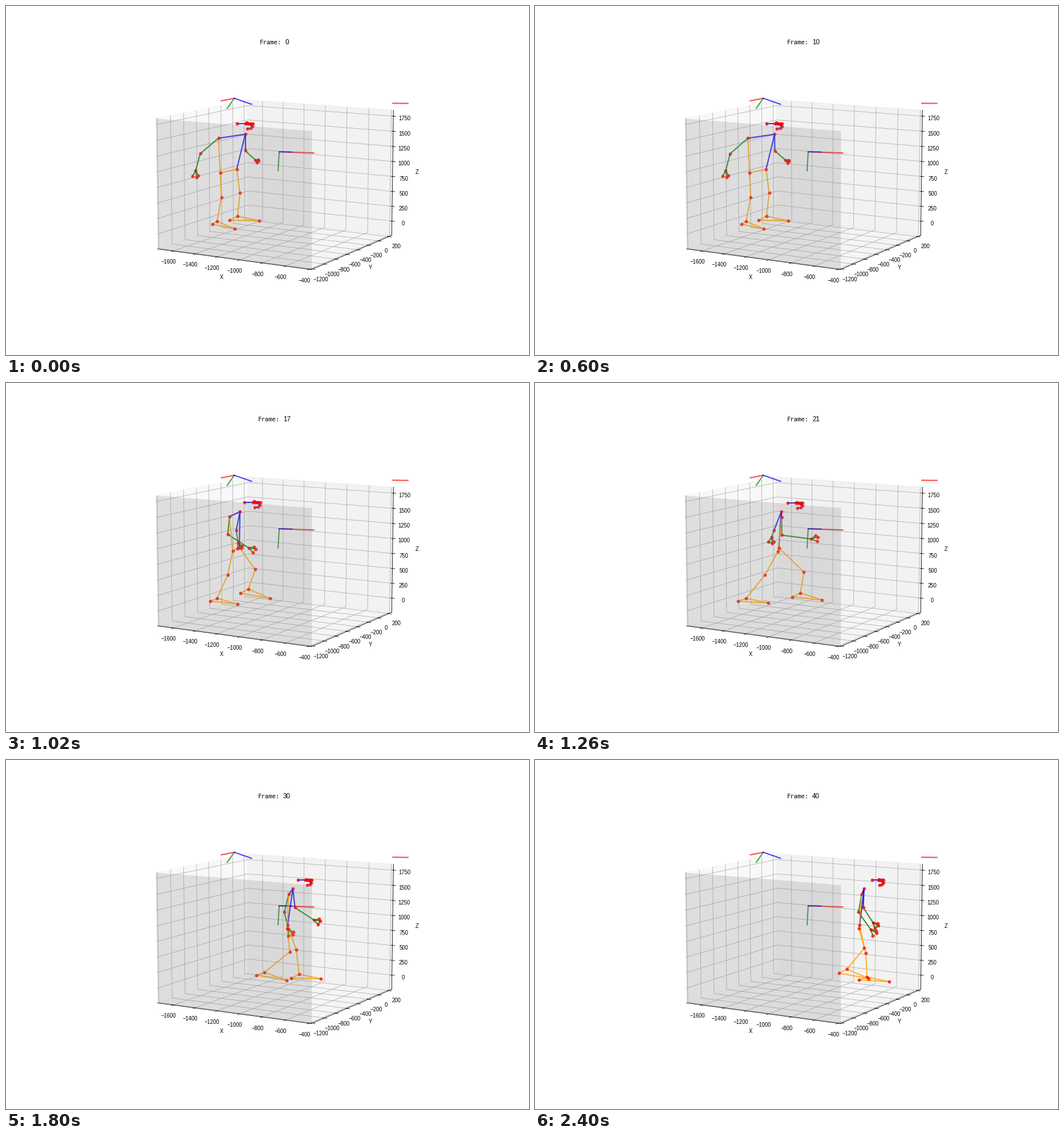
A matplotlib script for the animation above (2.46 s loop, 917 by 611 pixels).

```python
import numpy as np
import matplotlib.pyplot as plt
from matplotlib.animation import FuncAnimation
from matplotlib.collections import LineCollection
from matplotlib.patches import Polygon

W, H = 917, 611
DPI = W / 12
FRAMES, STEP = 41, 60
T = np.arange(FRAMES, dtype=float)

plt.rcParams["font.family"] = "Liberation Sans"
plt.rcParams["font.size"] = 9

CHAINS = [
    ("blue", "nose eye3 eye2 eye1 ear1"),
    ("blue", "nose eye4 eye5 eye6 ear2"),
    ("blue", "mouth1 mouth2"),
    ("blue", "s1 s2 e2"),
    ("blue", "s2 h2"),
    ("green", "s1 e1 w1 p1"),
    ("green", "i1 w1 f1"),
    ("orange", "p1 i1"),
    ("green", "e2 w2 p2 i2 w2 f2"),
    ("orange", "s1 h1 h2"),
    ("orange", "h1 k1 a1 l1 t1 a1"),
    ("orange", "h2 k2 a2 l2 t2 a2"),
]


def progress(start, end):
    return np.clip((T - start) / (end - start), 0, 1)


def ease(u):
    return u * u * (3 - 2 * u)


def mix(a, b, u):
    return a + (b - a) * u


def pt(x, y):
    """Track of one point: an (x, y) row for every frame."""
    return np.column_stack([np.broadcast_to(x, T.shape), np.broadcast_to(y, T.shape)])


# Whole-body motion: stand, turn towards the right, then walk off
turn = ease(progress(10, 22))
travel = 390 + 7.54 * 2 * np.log1p(np.exp((T - 16.3) / 2))
swing = np.cos(np.pi * (T - 21.5) / 12.5)
walk = ease(progress(9, 17))
wave = np.sin(np.pi * progress(0, 10)) ** 2


def pair(joints, key, mid, across):
    joints[key + "1"] = mid + across / 2
    joints[key + "2"] = mid - across / 2


def add_head(joints):
    nose = joints["nose"] = pt(travel + 42, 211 + 4.5 * turn)
    narrow = 1 - 0.011 * np.maximum(T - 17, 0)

    def put(name, dx, dy):
        joints[name] = nose + pt(dx * narrow, dy)

    for n, dx in enumerate(np.linspace(-12, 0.5, 6), 1):
        put(f"eye{n}", dx, -5)
    put("ear1", -27, -5)
    put("ear2", -10, -6.5)
    put("mouth1", -9, 4)
    put("mouth2", -3, 2.8)


def add_arm(joints, side, elbow, angle, length, hand):
    """Forearm angle is measured from straight down, positive to the right."""
    e = joints["e" + side] = joints["s" + side] + elbow
    along = pt(np.sin(angle), np.cos(angle))
    out = pt(np.cos(angle), -np.sin(angle))
    w = joints["w" + side] = e + along * length[:, None]
    for tip, reach, spread in (("p", 11, -3), ("i", 11, 5), ("f", 7, 7)):
        joints[tip + side] = w + hand * (reach * along + spread * out)


def add_leg(joints, side, start, steps, heel, toe):
    """Each step is (first frame, last frame, dx, dy) of the ankle."""
    x, y = start
    bend, lift = 5, 0
    for first, last, dx, dy in steps:
        u = progress(first, last)
        x = x + dx * ease(u)
        y = y + dy * ease(u)
        bend = bend + 20 * np.sin(np.pi * u)
        lift = lift + 80 * u * (1 - u) ** 3
    ankle = joints["a" + side] = pt(x, y - lift)
    joints["k" + side] = (joints["h" + side] + ankle) / 2 + pt(bend, 0.1 * bend)
    joints["l" + side] = ankle + heel
    joints["t" + side] = ankle + toe + pt(0, lift)


def build_joints():
    joints = {}
    add_head(joints)
    lean = 6 - 9 * np.sin(np.pi * turn)
    pair(joints, "s", pt(travel + lean, 228 + 2.5 * turn),
         pt(-47 + (43 + 6 * swing) * turn, 7 + 3 * turn))
    pair(joints, "h", pt(travel, 289 + 3 * turn), pt(-29 + 28 * turn, 6))
    add_arm(joints, "1", pt(mix(-32, -5 + 5 * swing, walk), mix(27, 31, walk)),
            np.radians(mix(-15, 38 + 45 * swing, walk)) - 0.4 * wave,
            mix(31, 38 + 14 * swing, walk), 1)
    add_arm(joints, "2", pt(mix(0, -2 - 11 * swing, walk), mix(29, 33, walk)),
            np.radians(mix(48, 30 - 50 * swing, walk)) - wave,
            mix(24, 30 - 18 * swing, walk), mix(0.5, 0.9, walk)[:, None])
    add_leg(joints, "1", (370, 377), [(22.5, 40, 212, 3)],
            pt(-8 - 6 * turn, 5), pt(31 + 8 * turn, 13 - 5 * turn))
    add_leg(joints, "2", (406, 368), [(13, 28, 108, 7), (35.5, 53, 200, -3)],
            pt(-14, 7), pt(38, 8))
    return joints


def build_bones():
    bones = []
    for color, chain in CHAINS:
        names = chain.split()
        bones += [(a, b, color) for a, b in zip(names, names[1:])]
    return bones


joints = build_joints()
bones = build_bones()

fig = plt.figure(figsize=((W + 1e-6) / DPI, (H + 1e-6) / DPI), dpi=DPI,
                 facecolor="white")
fig.subplots_adjust(left=0.124, right=0.899)

# The room
room = fig.add_subplot(111, projection="3d")
room.view_init(elev=10, azim=-60)
room.set_xticks(range(-1600, -399, 200))
room.set_yticks(range(-1200, 201, 200))
room.set_zticks(range(0, 1751, 250))
room.set_xlim(-1746, -381)
room.set_ylim(-1220, 262)
room.set_zlim(-240, 1848)
room.set_xlabel("X")
room.set_ylabel("Y")
room.set_zlabel("Z")

# Pixel stage on top of the room
stage = fig.add_axes([0, 0, 1, 1])
stage.set_xlim(0, W)
stage.set_ylim(H, 0)
stage.axis("off")


def triad(origin, **tips):
    for color, tip in tips.items():
        stage.plot(*zip(origin, tip), color=color, lw=2, alpha=0.7, zorder=2)


triad((400.3, 161.6), red=(377.5, 166), green=(388, 179), blue=(430.5, 172))
triad((479, 255.2), red=(539.5, 257.2), green=(477, 288.5), blue=(501.5, 255.7))
triad((678.3, 170.2), red=(704.8, 170.6))

body = LineCollection([], colors=[c for _, _, c in bones], linewidths=2,
                      alpha=0.8, capstyle="projecting", zorder=3)
stage.add_collection(body, autolim=False)
dots = stage.scatter([], [], s=20, c="red", alpha=0.7, zorder=4)

# Translucent front wall
stage.add_patch(Polygon([(262.8, 197), (536.7, 219), (536.2, 461.3), (266, 425.4)],
                        facecolor="0.5", edgecolor="none", alpha=0.21, zorder=5))

ADVANCE = 6 * DPI / 72
word = stage.text(0, 67, "Frame:", family="DejaVu Sans Mono", size=10)
count = stage.text(0, 67, "", size=11)


def update(i):
    body.set_segments([(joints[a][i], joints[b][i]) for a, b, _ in bones])
    dots.set_offsets([p[i] for p in joints.values()])
    left = 470 - (7 + len(str(i))) * ADVANCE / 2
    word.set_x(left)
    count.set_x(left + 7 * ADVANCE)
    count.set_text(str(i))
    return body, dots, word, count


anim = FuncAnimation(fig, update, frames=FRAMES, interval=STEP, repeat=True,
                     repeat_delay=0, blit=False)
plt.show()
```
